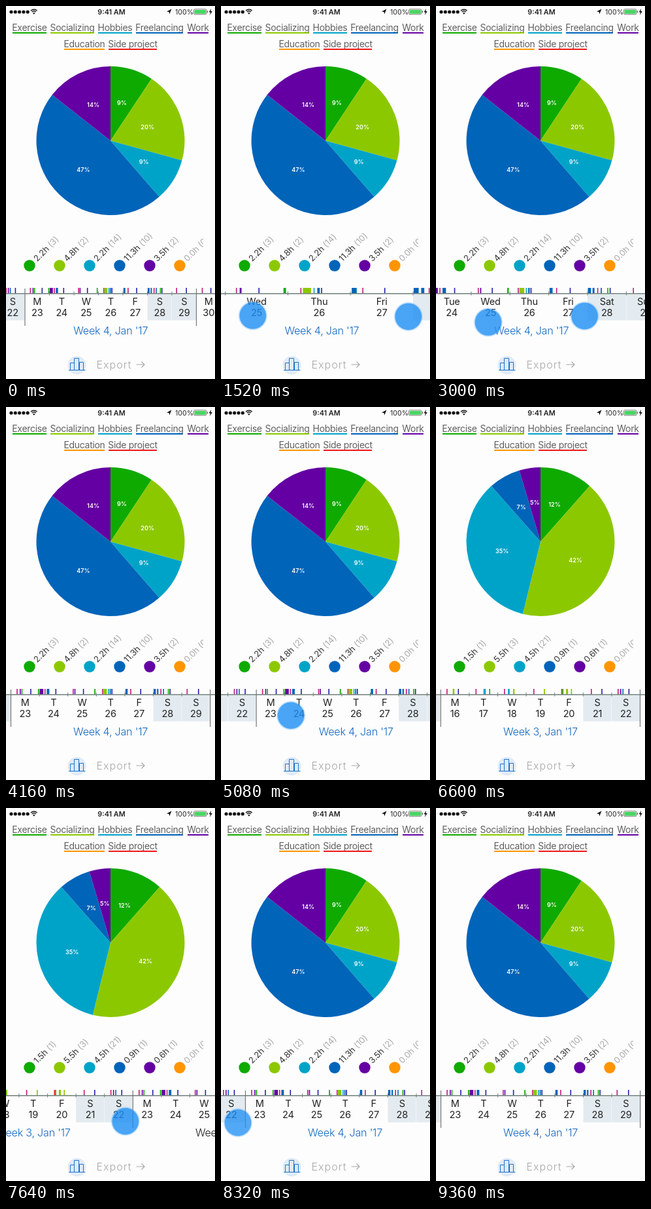
Write an HTML page that moves like this. It is 320 px wide and 569 px high and loops after 9.44 s.

```html
<!DOCTYPE html>
<html lang="en">
<head>
<meta charset="utf-8">
<title>Activity report</title>
<style>
  html, body { margin: 0; width: 100%; height: 100%; overflow: hidden; background: #fefdfe; }
  svg { display: block; width: 100vw; height: 100vh; }
  text { font-family: Inter, Roboto, "Liberation Sans", sans-serif; fill: #222; }
  .mid text, text.mid { text-anchor: middle; }
  .legend text { font-size: 14px; letter-spacing: -.3px; fill: #606060; }
  .share text { font-size: 9px; font-weight: 600; fill: #fff; }
  .hours text { font-size: 13px; letter-spacing: -.1px; fill: #333; }
  .hours tspan, .hours text.none { fill: #aaa; }
  .day { font-size: 14.6px; letter-spacing: -.2px; }
  .week { font-size: 16.2px; font-weight: 300; letter-spacing: -.25px; }
</style>
</head>
<body>
<svg viewBox="0 0 320 569">
  <defs>
    <clipPath id="hoursClip"><rect x="0" y="335" width="302" height="80"/></clipPath>
    <radialGradient id="touch">
      <stop offset="0" stop-color="#1c8ef3" stop-opacity=".8"/>
      <stop offset=".86" stop-color="#1c8ef3" stop-opacity=".8"/>
      <stop offset=".91" stop-color="#5aaef5" stop-opacity=".4"/>
      <stop offset="1" stop-color="#8cc8fa" stop-opacity="0"/>
    </radialGradient>
  </defs>
  <rect width="320" height="569" fill="#fefdfe"/>

  <g id="status">
    <text class="mid" x="161.5" y="13" font-size="10.8" font-weight="600">9:41 AM</text>
    <text x="259" y="13" font-size="10.6">100%</text>
    <path d="M253.500 4.500L246 8.400L249.500 8.900L250.200 12.500Z" fill="#111"/>
    <rect x="287.500" y="4.800" width="19.500" height="8" rx="1.800" fill="none" stroke="#444" stroke-width=".7"/>
    <rect x="288.600" y="5.900" width="17.300" height="5.800" rx=".8" fill="#46d660"/>
    <path d="M308.300 7.300v3" stroke="#444"/>
    <path d="M314 4L310.700 9.500H313L312 14L315.800 8H313.500Z" fill="#111"/>
    <path d="M38 7.200a7 7 0 0 1 9.600 0M39.700 9.100a4.600 4.600 0 0 1 6.200 0" fill="none" stroke="#111" stroke-width="1.400"/>
    <path d="M41 10.800a2.700 2.700 0 0 1 3.600 0L42.800 12.700Z" fill="#111"/>
  </g>
  <g id="legend" class="legend mid"></g>
  <g id="pie" class="share mid"></g>
  <g id="dots"></g>
  <g id="hours" class="hours" clip-path="url(#hoursClip)"></g>
  <g id="timeline" class="mid"></g>

  <circle cx="108.500" cy="548" r="14" fill="#e0ebf7"/>
  <path d="M96 555.500H121.500M98.500 555V544.500H104.500V555M104.500 545V537.500H111.500V555M112.500 555V543.500H118.500V555" fill="none" stroke="#1f72c6"/>
  <text x="138.500" y="553" font-size="16" font-weight="300" letter-spacing="1" style="fill:#a8a8a8">Export</text>
  <path d="M199.500 547H212M207.500 542.500L212 547L207.500 551.500" fill="none" stroke="#a8a8a8" stroke-width="1.200"/>
  <g id="touches"></g>
</svg>
<script>
const LOOP = 9440;
const GREEN = '#0faa00', LIME = '#8cc800', CYAN = '#00a3c8', BLUE = '#0064b9',
      PURPLE = '#6400a3', ORANGE = '#ff9500', RED = '#f01818', MAGENTA = '#c0187c', NAVY = '#2020a8';
const colors = [GREEN, LIME, CYAN, BLUE, PURPLE, ORANGE];
const $ = id => document.getElementById(id);
const lerp = (a, b, p) => a + (b - a) * p;
const clamp = v => Math.max(0, Math.min(1, v));
const smooth = v => { v = clamp(v); return v * v * (3 - 2 * v); };
const ramp = (t, start, length) => smooth((t - start) / length);
const n = v => v.toFixed(2);

const weeks = {
  3: { hours: [1.5, 5.5, 4.5, .9, .6, 0], counts: [1, 3, 21, 1, 1, 0] },
  4: { hours: [2.24, 4.78, 2.24, 11.27, 3.46, 0], counts: [3, 2, 14, 10, 2, 0] }
};

// Day of month: [start, length, color] in fractions of that day
const events = {
  16: [[.2, 0, MAGENTA], [.42, .06, LIME], [.6, 0, NAVY]],
  17: [[.22, 0, MAGENTA], [.5, .08, CYAN], [.7, 0, GREEN]],
  18: [[.22, 0, MAGENTA], [.36, .06, CYAN], [.54, .05, LIME]],
  19: [[.25, 0, MAGENTA], [.62, .04, LIME]],
  20: [[.23, 0, RED], [.27, 0, GREEN], [.4, .07, LIME], [.57, .04, LIME]],
  21: [[.27, 0, MAGENTA], [.64, 0, NAVY]],
  22: [[.21, 0, MAGENTA], [.3, 0, PURPLE], [.38, 0, BLUE], [.59, 0, NAVY]],
  23: [[.2, 0, MAGENTA], [.31, 0, PURPLE], [.37, 0, GREEN], [.68, 0, NAVY], [.95, .04, GREEN]],
  24: [[.01, .13, PURPLE], [.18, 0, MAGENTA], [.26, .09, BLUE], [.56, 0, NAVY]],
  25: [[.17, 0, MAGENTA], [.23, .03, PURPLE], [.53, 0, NAVY], [.93, .04, GREEN]],
  26: [[.2, 0, MAGENTA], [.24, .13, LIME], [.41, 0, CYAN], [.47, .04, BLUE], [.53, 0, NAVY]],
  27: [[.02, .08, BLUE], [.19, 0, MAGENTA], [.54, 0, NAVY]],
  28: [[.01, .08, BLUE], [.13, .05, BLUE], [.25, 0, MAGENTA], [.34, .03, BLUE], [.51, 0, GREEN], [.57, 0, NAVY]],
  29: [[.17, 0, MAGENTA], [.57, 0, NAVY]],
  30: [[.22, 0, MAGENTA], [.57, 0, NAVY]]
};

// Time, day width, left edge of Monday 23
const view = [
  [480, 37.5, 29], [1520, 95.8, -185], [1780, 99, -197], [2080, 96, -190], [3000, 59.4, -65],
  [3560, 43, 6], [3700, 42.5, 11], [4060, 43.6, 7.5],
  [4640, 43.6, 7.5], [5600, 43.6, 160], [5760, 43.6, 196], [6080, 43.6, 270], [6400, 43.6, 312.5],
  [6960, 43.6, 312.5], [7640, 43.6, 194.5], [7800, 43.6, 160], [8300, 43.6, 40], [8700, 43.6, 7.5]
];

function slope(i, k) {
  if (!i || i === view.length - 1) return 0;
  const [a, b, c] = [view[i - 1], view[i], view[i + 1]];
  const left = (b[k] - a[k]) / (b[0] - a[0]), right = (c[k] - b[k]) / (c[0] - b[0]);
  return left * right > 0 ? 2 * left * right / (left + right) : 0;
}

function sample(t, k) {
  if (t <= view[0][0]) return view[0][k];
  const i = view.findIndex(key => key[0] > t) - 1;
  if (i < 0) return view[view.length - 1][k];
  const a = view[i], b = view[i + 1], span = b[0] - a[0], p = (t - a[0]) / span;
  return lerp(a[k], b[k], smooth(p)) +
    span * p * (1 - p) * ((1 - p) * slope(i, k) - p * slope(i + 1, k));
}

// Touches are pinned to a day position while they last
const touches = [
  { day: 2.44, from: 300, to: 3660, y0: 464, y1: 487 },
  { day: 4.925, from: 300, to: 3660, y0: 474.5, y1: 472.5 },
  { day: 1.215, from: 4440, to: 6080, y0: 470, y1: 471.5 },
  { day: -.264, from: 6760, to: 8300, y0: 475, y1: 480 }
];

function drawPie(amount, week) {
  const hours = weeks[4].hours, next = weeks[3].hours;
  const total = a => a.reduce((x, y) => x + y, 0);
  const parts = hours.map((h, i) => lerp(h / total(hours), next[i] / total(next), amount));
  const point = (turn, r) => [n(160 + r * Math.sin(turn * 2 * Math.PI)), n(205.5 - r * Math.cos(turn * 2 * Math.PI))];
  const shown = weeks[week].hours;
  let turn = 0, slices = '', labels = '';
  parts.forEach((part, i) => {
    if (!part) return;
    const end = turn + part, [x, y] = point(turn + part / 2, 60.5);
    slices += `<path d="M160 205.5L${point(turn, 113.5)}A113.5 113.5 0 ${+(part > .5)} 1 ${point(end, 113.5)}Z" fill="${colors[i]}"/>`;
    labels += `<text x="${x}" y="${+y + 3.3}">${Math.round(100 * shown[i] / total(shown))}%</text>`;
    turn = end;
  });
  $('pie').innerHTML = slices + labels;
}

function drawHours(amount) {
  const set = (week, opacity) => opacity <= 0 ? '' : `<g opacity="${n(opacity)}">` + weeks[week].hours.map((h, i) =>
    `<text class="${h ? '' : 'none'}" transform="translate(${47.8 + 46 * i} 390.5) rotate(-45)">${h.toFixed(1)}h <tspan>(${weeks[week].counts[i]})</tspan></text>`).join('') + '</g>';
  $('hours').innerHTML = set(4, 1 - amount) + set(3, amount);
}

function drawTimeline(w, x23, current) {
  const names = ['Mon', 'Tue', 'Wed', 'Thu', 'Fri', 'Sat', 'Sun'];
  let shade = '', bars = '', labels = '', lines = '';
  for (let day = 15; day <= 31; day++) {
    const x = x23 + (day - 23) * w, weekday = (day + 5) % 7;
    if (x > 330 || x + w < -10) continue;
    if (weekday > 4) shade += `<rect x="${n(x)}" y="440" width="${n(w - .5)}" height="39.5" fill="#e3ebf0"/>`;
    for (const [start, length, color] of events[day] || [])
      bars += `<rect x="${n(x + start * w)}" y="430" width="${n(Math.max(1.6, length * w))}" height="8.5" fill="${color}"/>`;
    const name = w > 50 ? names[weekday] : names[weekday][0];
    labels += `<text class="day" x="${n(x + w / 2)}" y="456">${name}</text><text class="day" x="${n(x + w / 2)}" y="473">${day}</text>`;
    lines += weekday ? `<path d="M${n(x)} 435.5V441.500" stroke="#6f807b"/>` : `<path d="M${n(x)} 431V488" stroke="#777" stroke-width="1.200"/>`;
  }
  const pull = Math.pow(43.6 / Math.max(w, 43.6), .7);
  for (let week = 2; week <= 5; week++) {
    const center = x23 + (3.5 + (week - 4) * 7) * w;
    labels += `<text class="week" x="${n(160 + (center - 160) * pull)}" y="500.500" style="fill:${week === current ? '#1469c0' : '#222'}">Week ${week}, Jan '17</text>`;
  }
  $('timeline').innerHTML = shade + bars + '<path d="M0 438.800H320" stroke="#6f807b" stroke-width="1.500"/>' + lines + labels;
}

function drawTouches(t, w, x23) {
  $('touches').innerHTML = touches.map(({ day, from, to, y0, y1 }) => {
    const alpha = ramp(t, from, 140) * (1 - ramp(t, to, 160));
    return alpha && `<circle cx="${n(x23 + day * w)}" cy="${n(lerp(y0, y1, clamp((t - from) / (to - from))))}" r="23" fill="url(#touch)" opacity="${n(alpha)}"/>`;
  }).filter(Boolean).join('');
}

function render(t) {
  const w = sample(t, 1), x23 = sample(t, 2);
  const week = t >= 5600 && t < 7800 ? 3 : 4;
  const toThird = ramp(t, 5600, 340), toFourth = ramp(t, 7800, 340);
  drawPie(toThird - toFourth, week);
  drawHours(toThird ** 2 - toFourth ** 2);
  drawTimeline(w, x23, week);
  drawTouches(t, w, x23);
}

const legend = [
  ['Exercise', 10, 62, 38, GREEN], ['Socializing', 68, 135, 38, LIME], ['Hobbies', 141, 193, 38, CYAN],
  ['Freelancing', 199, 271, 38, BLUE], ['Work', 278, 310, 38, PURPLE],
  ['Education', 89, 151, 63, ORANGE], ['Side project', 157, 231, 63, RED]
];
$('legend').innerHTML = legend.map(([name, left, right, y, color]) =>
  `<text x="${(left + right) / 2}" y="${y}">${name}</text><rect x="${left}" y="${y + 2}" width="${right - left}" height="2" fill="${color}"/>`).join('');
$('dots').innerHTML = colors.map((color, i) => `<circle cx="${36 + 46 * i}" cy="396" r="8.700" fill="${color}"/>`).join('');
$('status').insertAdjacentHTML('beforeend',
  [0, 1, 2, 3, 4].map(i => `<circle cx="${8 + 6.3 * i}" cy="9" r="2.600" fill="#111"/>`).join(''));

const begin = performance.now();
function tick() {
  render((performance.now() - begin) % LOOP);
  requestAnimationFrame(tick);
}
tick();
</script>
</body>
</html>
```
